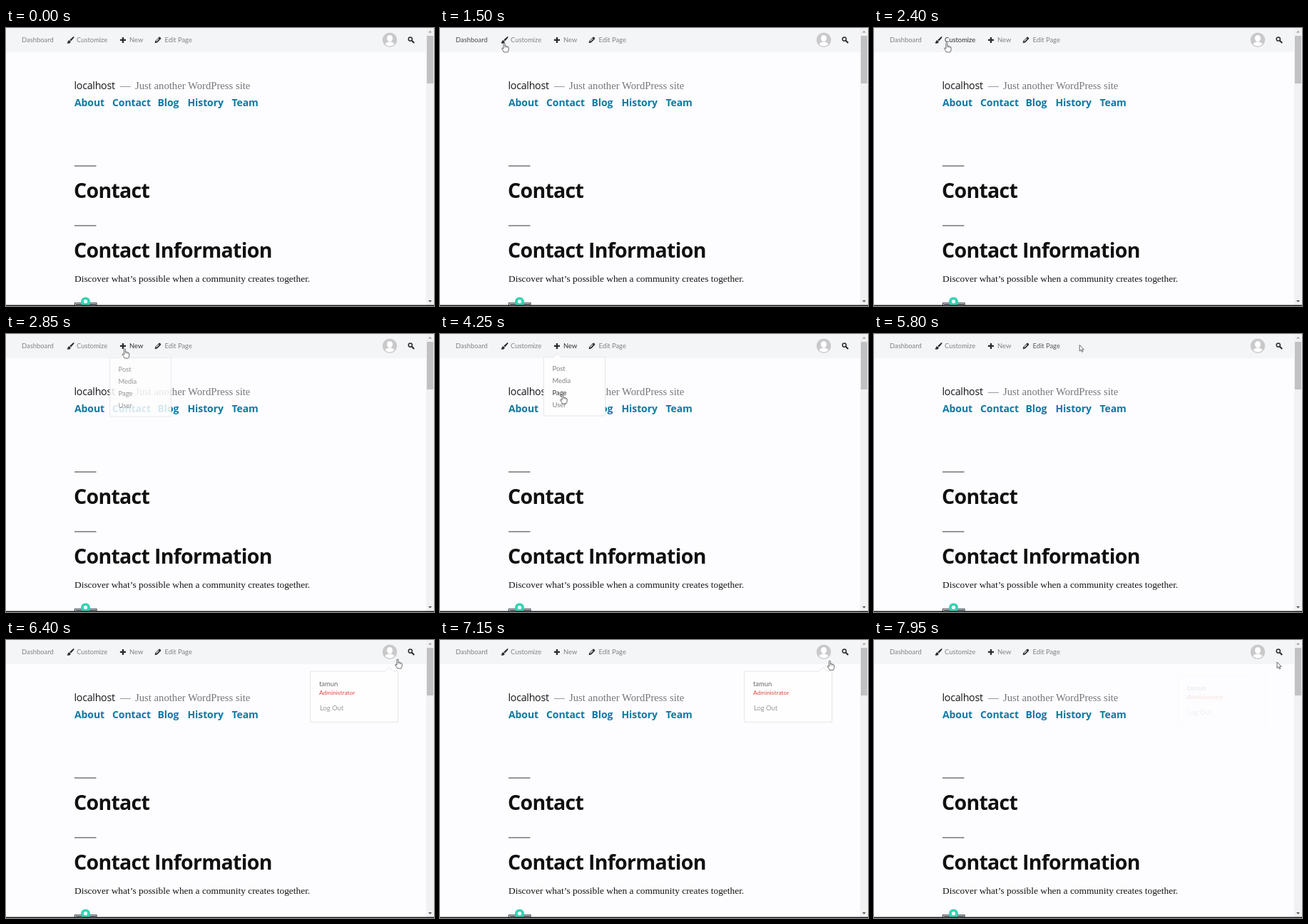
An HTML page that plays this animation: 600x391 px, repeating every 8 s.

```html
<!DOCTYPE html>
<html lang="en">
<head>
<meta charset="utf-8">
<title>Toolbar hover menus</title>
<style>
html, body { margin: 0; width: 100%; height: 100%; overflow: hidden; background: #fdfcfe; }
svg { display: block; width: 100vw; height: 100vh; }
.ui { font: 9.4px Lato, sans-serif; fill: #828284; }
.role { font-size: 8.4px; fill: #dc4444; }
.serif { font-family: "Liberation Serif", "Times New Roman", serif; }
.sans { font-family: "Open Sans", "Noto Sans", sans-serif; }
.head { font-size: 28.5px; font-weight: 700; letter-spacing: -.7px; fill: #111; }
.nav { font-size: 14px; font-weight: 700; letter-spacing: -.1px; fill: #0e7aa3; }
.panel { fill: #fefefe; stroke: #e6e6ea; stroke-width: 1; }
.cursor { fill: #fff; stroke: #47474a; stroke-width: .8; stroke-linejoin: round; }
</style>
</head>
<body>
<svg viewBox="0 0 600 391" preserveAspectRatio="none">
  <rect width="600" height="391" fill="#fdfcfe"/>
  <rect width="589" height="34" fill="#f4f5f7"/>

  <g class="ui">
    <text id="dash" x="22" y="20">Dashboard</text>
    <text id="custom" x="99" y="20">Customize</text>
    <text id="new" x="173" y="20">New</text>
    <text id="edit" x="222.5" y="20">Edit Page</text>
  </g>
  <g fill="#2b2b2d">
    <path d="M95.4 12.3Q94.6 11.8 93.6 12.7L89.3 16.8 91.1 18.6 95 14Q95.8 13 95.4 12.3ZM88.6 17.3Q86.9 17.4 86.7 19.3 86.5 20.8 85 21.1 88.2 22.4 89.9 20.9 91 19.9 90.5 19Z"/>
    <path d="M162.8 12.9h2.3v2.9h2.9v2.3h-2.9v2.9h-2.3v-2.9h-2.9v-2.3h2.9z"/>
    <path d="M208.6 21.3L209.3 18 214.3 12.9Q215.2 12.1 216.2 13.1L216.8 13.7Q217.7 14.6 216.9 15.5L211.9 20.6Z"/>
    <path d="M210.6 18.5L214.3 14.8" stroke="#f4f5f7" stroke-width="1.1"/>
  </g>
  <circle cx="538" cy="16.8" r="10.2" fill="#c9c8cb"/>
  <clipPath id="face"><circle cx="538" cy="16.8" r="8.8"/></clipPath>
  <g fill="#fff" clip-path="url(#face)">
    <ellipse cx="538" cy="14.6" rx="4" ry="4.7"/>
    <ellipse cx="538" cy="24.5" rx="7.2" ry="4.9"/>
  </g>
  <g fill="none" stroke="#2b2b2d">
    <circle cx="566.8" cy="15.6" r="2.6" stroke-width="1.5"/>
    <path d="M568.9 17.7L572.2 20.9" stroke-width="2.1"/>
  </g>

  <text class="sans" x="95.5" y="86" font-size="14.2" letter-spacing="-.25" fill="#151515">localhost</text>
  <g class="serif" font-size="14.7" fill="#77777a">
    <text x="160" y="86">—</text>
    <text x="181" y="86">Just another WordPress site</text>
  </g>
  <g class="sans nav">
    <text x="96" y="110">About</text>
    <text x="149" y="110">Contact</text>
    <text x="212.5" y="110">Blog</text>
    <text x="254.5" y="110">History</text>
    <text x="316.5" y="110">Team</text>
  </g>
  <path d="M96 194h30.5M96 278h30.5" stroke="#77777a" stroke-width="1.3"/>
  <g class="sans head">
    <text x="95" y="239">Contact</text>
    <text x="95" y="322.5">Contact Information</text>
  </g>
  <text class="serif" x="96" y="357" font-size="13.4" fill="#151515">Discover what’s possible when a community creates together.</text>
  <path d="M96.5 391V386.8H127V391M98 388.6H126" fill="none" stroke="#2c3840" stroke-width="1.1"/>
  <circle cx="111.5" cy="385" r="6.6" fill="#35d3b3"/>
  <circle cx="111.5" cy="384.6" r="2.6" fill="#fff"/>

  <rect x="589" width="11" height="391" fill="#f1f0f2"/>
  <rect x="590" y="11" width="9" height="67" fill="#c1c0c2"/>
  <path d="M592 6.6L594.5 3.8 597 6.6Z" fill="#a2a2a4"/>
  <path d="M592 383L594.5 385.8 597 383Z" fill="#555557"/>
  <rect y="389.6" width="600" height="1.4" fill="#161616"/>

  <g id="newMenu" class="ui">
    <path class="panel" d="M145.5 32.5H159.5L164.5 27.3 169.5 32.5H231.5V115H145.5Z"/>
    <text id="post" x="157.5" y="51.5">Post</text>
    <text id="media" x="157.5" y="69">Media</text>
    <text id="page" x="157.5" y="85.5">Page</text>
    <text id="user" x="157.5" y="102.5">User</text>
  </g>
  <g id="userMenu" class="ui">
    <path class="panel" d="M426.5 44H531.5L537 38.5 542.5 44H549.5V115.5H426.5Z"/>
    <text x="439" y="65.3" fill="#68686a">tamun</text>
    <text class="role" x="439" y="77">Administrator</text>
    <text x="440" y="99" fill="#98989a">Log Out</text>
  </g>

  <g id="pointer" class="cursor">
    <path id="arrow" d="M0 0V8.6L2 6.8 3.3 9.9 4.7 9.3 3.4 6.3H6Z"/>
    <g id="hand">
      <path d="M-1 .8Q-1 0 0 0 1 0 1 .8V4.5Q1.2 3.9 2 4 2.8 4 2.9 4.9 3.2 4.4 3.9 4.6 4.6 4.8 4.7 5.5 5.2 5.1 5.8 5.6 6.2 5.9 6.2 6.6V9Q6 11.5 5 13H-.3Q-1.2 11 -3 8.8 -3.8 7.6 -3 7.1 -2.2 6.8 -1 8.3Z"/>
      <path d="M1 4.5V6.6M2.9 4.9V6.8M4.7 5.5V7" fill="none" stroke-width=".6"/>
    </g>
  </g>
</svg>
<script>
const LOOP = 8000, STEP = 50;
const $ = id => document.getElementById(id);

// time, x, y of the pointer tip
const track = [
  [750, 150, 400], [1150, 50, 17], [1300, 50, 17], [1500, 90, 21],
  [2300, 90, 21], [2700, 166, 21], [3000, 167, 21], [3450, 167, 21],
  [4250, 172, 85], [4650, 172, 85], [5000, 228, 12], [5300, 232, 14],
  [5650, 232, 14], [6200, 540, 22], [6400, 549, 27], [6650, 549, 28],
  [7000, 549, 28], [7250, 545, 30], [7700, 545, 30], [7950, 565, 31]
];
const handTimes = [[1100, 5750], [6050, 7800]];

// fade in from, to; fade out from, to
const hovers = {
  dash: [1050, 1200, 1400, 1700],
  custom: [1500, 1700, 2400, 2600],
  new: [2500, 2700, 4700, 4850],
  edit: [4850, 5050, 5700, 5900],
  post: [3550, 3700, 3850, 4000],
  media: [3850, 3950, 4000, 4150],
  page: [4050, 4200, 4650, 4800]
};
const menus = {
  newMenu: [2600, 2900, 4700, 5130],
  userMenu: [6000, 6300, 7700, 7990]
};

const clamp = v => Math.max(0, Math.min(1, v));
const ramp = (t, a, b) => clamp((t - a) / (b - a));
const level = (t, [a, b, c, d]) => ramp(t, a, b) - ramp(t, c, d);

function pointAt(t) {
  let i = 0;
  while (i < track.length - 2 && t >= track[i + 1][0]) i++;
  const [t0, x0, y0] = track[i], [t1, x1, y1] = track[i + 1];
  const k = ramp(t, t0, t1), e = k * k * (3 - 2 * k);
  return [x0 + (x1 - x0) * e, y0 + (y1 - y0) * e];
}

function draw(t) {
  for (const id in hovers) {
    const c = Math.round(130 - 82 * level(t, hovers[id]));
    $(id).style.fill = `rgb(${c},${c},${c + 2})`;
  }
  for (const id in menus) {
    const a = level(t, menus[id]);
    $(id).style.opacity = a;
    $(id).setAttribute("transform", `translate(0 ${7 * (1 - a)})`);
  }
  const onLink = handTimes.some(([a, b]) => t >= a && t < b);
  $("hand").style.display = onLink ? "" : "none";
  $("arrow").style.display = onLink ? "none" : "";
  $("pointer").style.display = t < track[0][0] ? "none" : "";
  $("pointer").setAttribute("transform", `translate(${pointAt(t)})`);
}

const start = performance.now();
function tick() {
  const t = (performance.now() - start) % LOOP;
  draw(Math.floor(t / STEP) * STEP);
  requestAnimationFrame(tick);
}
tick();
</script>
</body>
</html>
```
